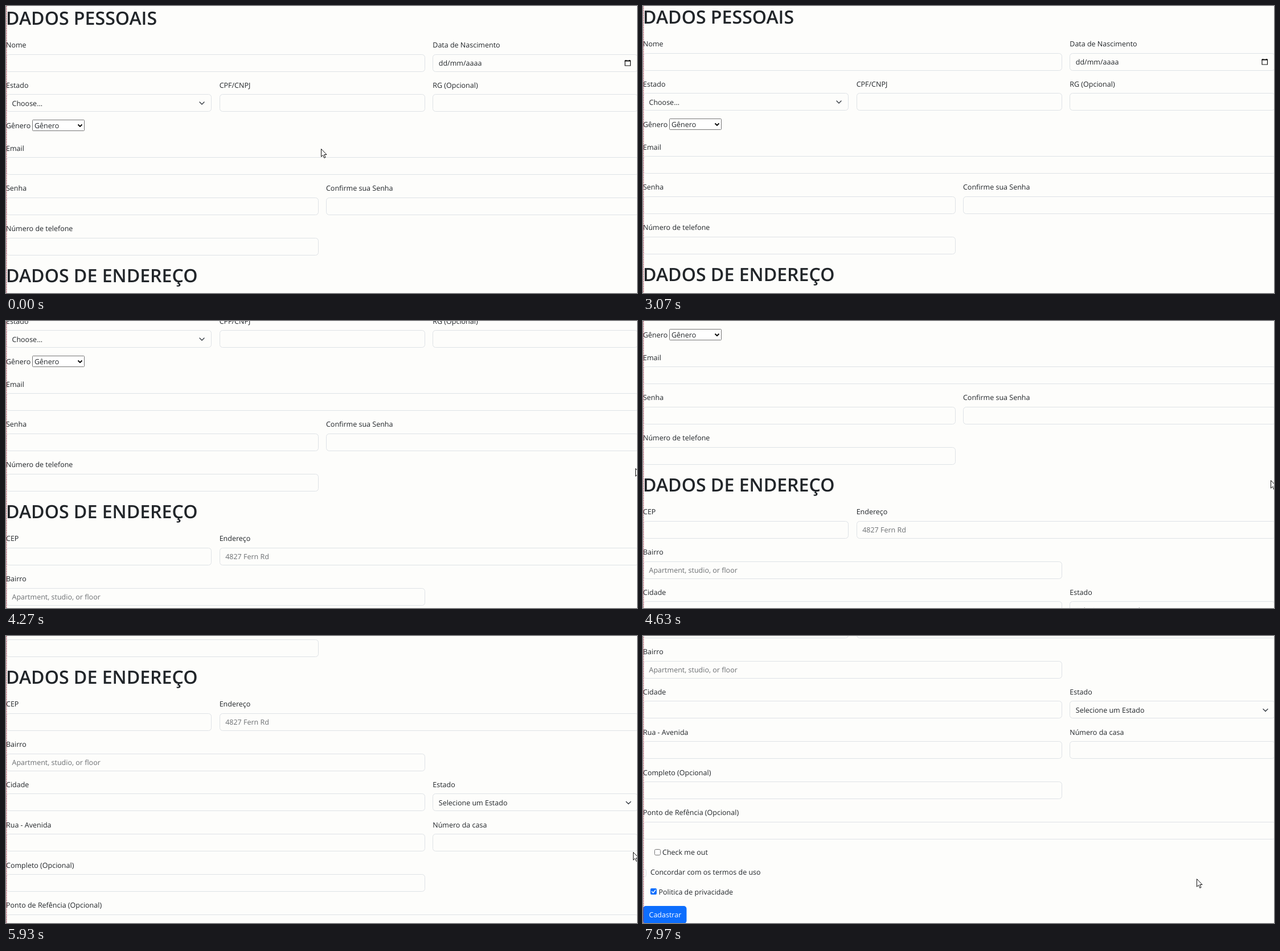
Animation, 1108 px wide and 505 px high, one loop 8 s. Source, as an HTML page:

```html
<!DOCTYPE html>
<html lang="pt-BR">
<head>
<meta charset="utf-8">
<title>Cadastro</title>
<style>
  html, body { margin: 0; width: 100%; height: 100%; overflow: hidden; background: #fdfdfb; }
  svg { display: block; width: 1108px; height: 505px; }
  text { font: 12.5px "Open Sans", "Noto Sans", sans-serif; fill: #212529; text-rendering: geometricPrecision; }
  .title { font-size: 32.1px; font-weight: 600; }
  .hint { fill: #6c6f72; }
  .light { fill: #fff; }
  .field { fill: none; stroke: #dee2e6; }
  .native { fill: #fff; stroke: #767676; }
  .line { fill: none; stroke: #343a40; stroke-width: 1.4; stroke-linecap: round; stroke-linejoin: round; }
</style>
</head>
<body>
<svg viewBox="0 0 1108 505">
  <g id="page"></g>
  <path id="cursor" d="M.5 .5V14.2L3.6 11.3 5.8 16.4 8 15.4 5.8 10.5H10Z" fill="#fff" stroke="#111" stroke-width="1"/>
</svg>
<script>
const page = document.getElementById('page');
const cursor = document.getElementById('cursor');
const COL = 93.66, GUTTER = 13.2;

function add(tag, attrs, content = '') {
  const el = document.createElementNS('http://www.w3.org/2000/svg', tag);
  for (const key in attrs) el.setAttribute(key, attrs[key]);
  el.textContent = content;
  page.append(el);
}

const path = (d, cls = 'line', style = '') => add('path', { d, class: cls, style });
const rect = (x, y, width, height, rx, cls, style = '') =>
  add('rect', { x, y, width, height, rx, class: cls, style });

// y is the vertical middle of the text
const text = (s, x, y, cls = '') => add('text', { x, y: Math.round(y + 4.2), class: cls }, s);
const title = (s, baseline) => add('text', { x: 0, y: baseline, class: 'title' }, s);

function field(label, col, span, y, value = '', cls = '') {
  const x = col * COL;
  text(label, x, y);
  rect(Math.round(x) + .5, Math.floor(y + 16) + .5, Math.round(span * COL - GUTTER) - 1, 30, 5, 'field');
  if (value) text(value, x + 10.5, y + 32, cls);
}

const chevron = (x, y) => path(`M${x - 4} ${y - 2}l4 4l4 -4`);

title('DADOS PESSOAIS', 32.5);
field('Nome', 0, 8, 69);
field('Data de Nascimento', 8, 4, 69, 'dd/mm/aaaa');
path('M1087 96.5h9.5v8.5h-9.5z', 'line', 'stroke:#111;stroke-width:1.2');
path('M1086.5 96.5h10.5M1088.5 95v1M1095 95v1', 'line', 'stroke:#111;stroke-width:2;stroke-linecap:butt');

field('Estado', 0, 4, 139.7, 'Choose...');
chevron(344, 171);
field('CPF/CNPJ', 4, 4, 139.7);
field('RG (Opcional)', 8, 4, 139.7);

text('Gênero', 0, 210.5);
rect(46.5, 200.5, 91, 19, 1, 'native');
text('Gênero', 50, 210.5);
path('M126.5 208.5l3.5 3.5l3.5 -3.5', 'line', 'stroke:#111;stroke-width:2;stroke-linecap:butt');

field('Email', 0, 12, 250.5);
field('Senha', 0, 6, 321.2);
field('Confirme sua Senha', 6, 6, 321.2);
field('Número de telefone', 0, 6, 392);

title('DADOS DE ENDEREÇO', 485.5);
field('CEP', 0, 4, 522);
field('Endereço', 4, 8, 522, '4827 Fern Rd', 'hint');
field('Bairro', 0, 8, 593, 'Apartment, studio, or floor', 'hint');
field('Cidade', 0, 8, 663.7);
field('Estado', 8, 4, 663.7, 'Selecione um Estado');
chevron(1093, 695.5);
field('Rua - Avenida', 0, 8, 734.5);
field('Número da casa', 8, 4, 734.5);
field('Completo (Opcional)', 0, 8, 805.3);
field('Ponto de Refência (Opcional)', 0, 12, 876);

rect(20.5, 940.5, 10, 10, 2, 'native');
text('Check me out', 34, 946);
rect(-7.5, 975.5, 13, 13, 3, 'field');
text('Concordar com os termos de uso', 13, 981);
rect(13, 1009, 11, 11, 2, '', 'fill:#0d6efd');
path('M15.5 1014.5l2.3 2.5l4 -5', 'line', 'stroke:#fff');
text('Politica de privacidade', 27.5, 1015.5);
rect(0, 1040, 76.5, 31, 5, '', 'fill:#0d6efd');
text('Cadastrar', 10.5, 1056, 'light');

path('M.75 0V1080', '', 'stroke:#a03a4c;stroke-width:1.5;stroke-dasharray:1.5 1.5');

// time, cursor x, cursor y, scroll offset
const keys = [
  [0, 553, 251, 0],
  [400, 553, 251, 0],
  [1630, 1052, 210, 0],
  [2300, 1114, 196, 0],
  [3050, 1114, 196, 0],
  [3600, 1112, 220, 52],
  [4630, 1102, 280, 186],
  [5930, 1101, 380, 402],
  [6670, 1105, 426, 506],
  [7300, 1106, 452, 565],
  [7550, 1104, 450, 565],
  [7970, 972, 427, 565],
  [8000, 972, 427, 565]
];

function frame(now) {
  const t = now % 8000;
  const i = keys.findIndex(k => k[0] > t);
  const a = keys[i - 1], b = keys[i];
  const p = (t - a[0]) / (b[0] - a[0]);
  const [x, y, scroll] = [1, 2, 3].map(n => Math.round(a[n] + (b[n] - a[n]) * p));
  page.setAttribute('transform', `translate(0 ${-scroll})`);
  cursor.setAttribute('transform', `translate(${x} ${y})`);
  requestAnimationFrame(frame);
}
frame(performance.now());
</script>
</body>
</html>
```
